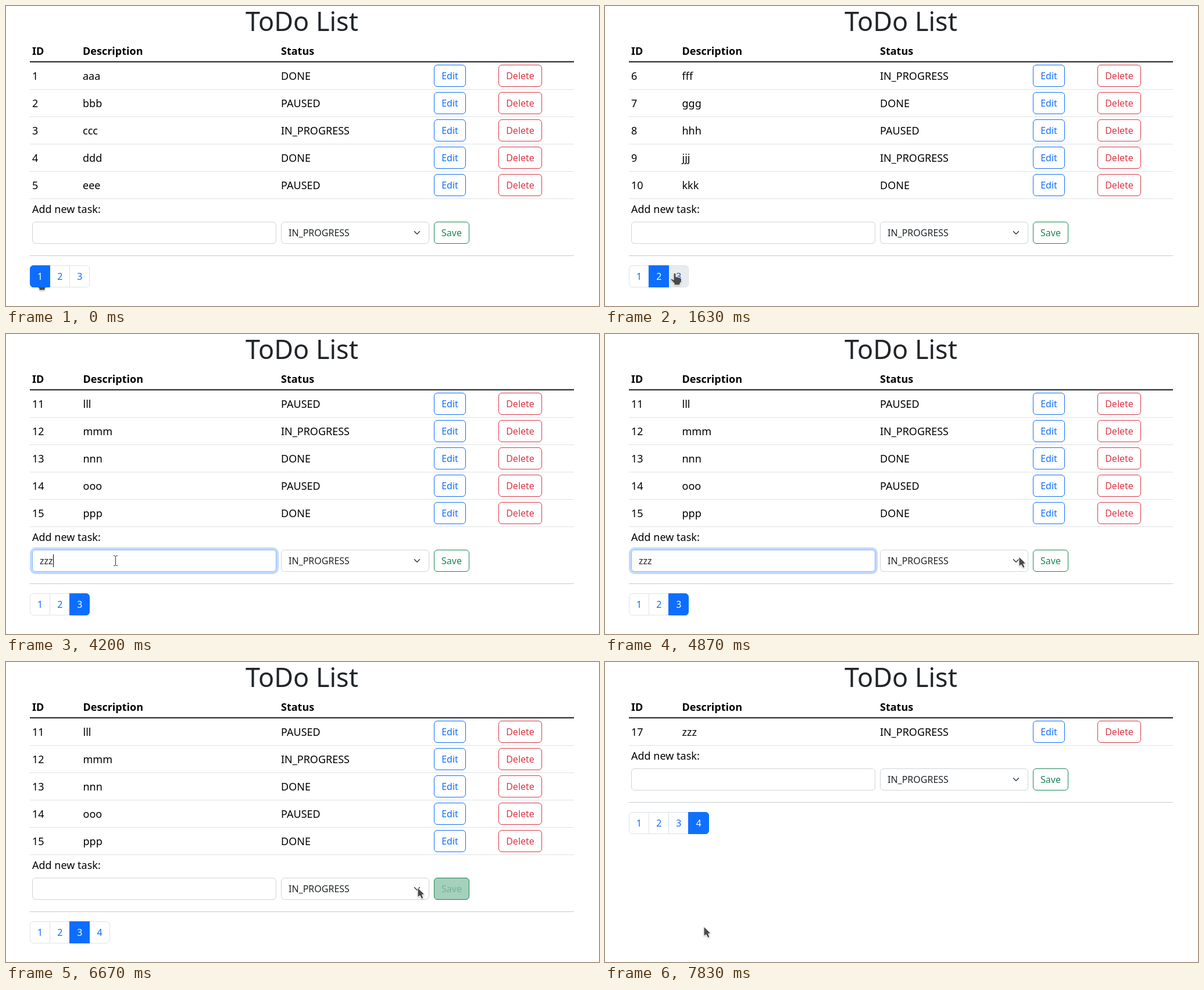
An HTML page that plays this animation: 1020 by 516 pixels, repeating every 8000 ms.

```html
<!DOCTYPE html>
<html lang="en">
<head>
<meta charset="utf-8">
<title>ToDo List</title>
<style>
  html, body { margin: 0; width: 100%; height: 100%; overflow: hidden; background: #fff; }
  body { position: relative; font: 18px/27px "Noto Sans", sans-serif; color: #000; }
  body *, svg { box-sizing: border-box; }
  .abs, .row, .row > *, #form, #form > * { position: absolute; white-space: pre; }
  h1 { left: 41px; width: 936px; top: -1px; margin: 0; font-size: 45px; line-height: 54px;
       font-weight: 300; text-align: center; color: #212529; }
  .row { left: 41px; width: 936px; height: 47px; border-bottom: 1px solid #dee2e6; }
  .row > span { top: 10px; }
  .row > :nth-child(1) { left: 4px; }
  .row > :nth-child(2) { left: var(--desc); }
  .row > :nth-child(3) { left: 432px; }
  .head { top: 50px; border-bottom: 2px solid #212529; font-weight: 700; }
  .head > span { top: 14px; }
  .btn, .field { height: 38px; border: 1px solid; border-radius: 6px; font-size: 16px; line-height: 36px; }
  .btn { text-align: center; }
  .row .btn { top: 4px; }
  .edit { left: 695px; width: 55px; color: #0d6efd; }
  .delete { left: 806px; width: 75px; color: #dc3545; }
  #form { left: 0; top: 0; width: 1020px; height: 516px; }
  .field { top: 371px; padding-left: 12px; border-color: #ced4da; color: #212529; }
  #input { left: 45px; width: 420px; }
  #caret { left: 58px; top: 379px; width: 1px; height: 22px; background: #000; }
  #select { left: 473px; width: 255px; }
  #select svg { position: absolute; right: 12px; top: 12px; }
  #save { left: 736px; top: 371px; width: 61px; border-color: #198754; }
  #hr { left: 41px; top: 429px; width: 936px; height: 1px; background: #c8c9ca; }
  #pages { left: 41px; top: 446px; display: flex; font-size: 16px; line-height: 36px; }
  #pages span { height: 38px; padding: 0 12px; border: 1px solid; margin-left: -1px; }
  #pages span:first-child { margin-left: 0; border-radius: 6px 0 0 6px; }
  #pages .last { border-radius: 0 6px 6px 0; }
  #cursor { left: 0; top: 0; overflow: visible; }
</style>
</head>
<body>
<h1 class="abs">ToDo List</h1>
<div class="row head"><span>ID</span><span>Description</span><span>Status</span></div>
<div id="rows"></div>
<div id="form">
  <span style="left:45px;top:336px">Add new task:</span>
  <div id="input" class="field"></div>
  <div id="caret"></div>
  <div id="select" class="field">IN_PROGRESS<svg width="16" height="12" viewBox="0 0 16 16"><path
    d="m2 5 6 6 6-6" fill="none" stroke="#343a40" stroke-width="2" stroke-linecap="round" stroke-linejoin="round"/></svg></div>
  <div id="save" class="btn">Save</div>
  <div id="hr"></div>
  <div id="pages"><span>1</span><span>2</span><span>3</span><span>4</span></div>
</div>
<svg id="cursor" class="abs" width="1" height="1"><path stroke-linejoin="round"/></svg>
<script>
const LOOP = 8000, FADE = 150;
const $ = id => document.getElementById(id);
const STATUS = { D: 'DONE', P: 'PAUSED', I: 'IN_PROGRESS' };

// Each page: time it opens, first id, description letters, status letters
const PAGES = [
  [-FADE, 1, 'abcde', 'DPIDP'],
  [930, 6, 'fghjk', 'IDPID'],
  [1800, 11, 'lmnop', 'PIDPD'],
  [7690, 17, 'z', 'I'],
];
const HOVERS = [[LOOP, LOOP], [480, 1400], [1400, 2200], [7430, 7690]];

// Pointer stops: time, x, y, shape from here on, easing towards this stop
const smooth = k => k * k * (3 - 2 * k);
const easeOut = k => 1 - (1 - k) ** 1.5;
const linear = k => k;
const PATH = [
  [0, 58, 468, 'hand'],
  [200, 58, 468, 'hand'],
  [770, 91, 466, 'hand', smooth],
  [1150, 91, 466, 'hand'],
  [1700, 121, 459, 'hand', smooth],
  [2050, 121, 459, 'hand'],
  [2330, 133, 441, 'arrow', k => k * k],
  [2640, 170, 409, 'beam', linear],
  [2850, 188, 390, 'beam', easeOut],
  [4220, 188, 390, 'beam'],
  [4560, 467, 387, 'arrow', k => k ** 1.5],
  [4870, 711, 383, 'arrow', k => 1 - (1 - k) ** 1.3],
  [5000, 760, 387, 'hand', easeOut],
  [6560, 760, 387, 'hand'],
  [6590, 740, 387, 'arrow', linear],
  [6670, 709, 388, 'arrow', linear],
  [7420, 170, 455, 'hand', easeOut],
  [7720, 170, 455, 'arrow'],
  [LOOP, 170, 455, 'arrow'],
];
const SHAPES = {
  arrow: 'M0 0V16.5L4 13.8 7 19.5 10 18 7.6 12.3 12 11.8Z',
  hand: 'M-2 1.5Q0-1.5 2 1.5V7L4 6.5 5.5 7.5 8 7.5 9 8.8 11.5 9.5V15L9 18V21H-1V18L-7 11.5Q-6 9-2 12Z',
  beam: 'M-3-8.5H-1L.5-7.5 2-8.5H4M.5-7.5V7.5M-3 8.5H-1L.5 7.5 2 8.5H4',
};

const ramp = (t, start) => smooth(Math.min(1, Math.max(0, (t - start) / FADE)));
const pulse = (t, on, off) => ramp(t, on) - ramp(t, off);
const mix = (a, b, k) => `color-mix(in srgb, ${a}, ${b} ${k * 100}%)`;

function drawRows([, first, letters, states]) {
  $('rows').innerHTML = [...letters].map((c, i) => `<div class="row" style="top:${97 + 47 * i}px">
    <span>${first + i}</span><span>${c.repeat(3)}</span><span>${STATUS[states[i]]}</span>
    <div class="btn edit">Edit</div><div class="btn delete">Delete</div></div>`).join('');
  document.body.style.setProperty('--desc', first > 1 ? '91.5px' : '91px');
  $('form').style.top = 47 * (letters.length - 5) + 'px';
}

function drawPager(t) {
  const count = t < 6130 ? 3 : 4;
  [...$('pages').children].forEach((el, i) => {
    const active = ramp(t, PAGES[i][0]) - (PAGES[i + 1] ? ramp(t, PAGES[i + 1][0]) : 0);
    const hover = pulse(t, ...HOVERS[i]);
    el.style.display = i < count ? '' : 'none';
    el.className = i === count - 1 ? 'last' : '';
    el.style.background = mix(mix('#fff', '#e9ecef', hover), '#0d6efd', active);
    el.style.color = mix(mix('#0d6efd', '#0a58ca', hover), '#fff', active);
    el.style.borderColor = mix('#dee2e6', '#0d6efd', active);
    el.style.zIndex = active > 0.5 ? 1 : 0;
  });
}

function drawForm(t) {
  const typed = t < 6130 ? [3670, 3900, 4200].filter(at => t >= at).length : 0;
  const focus = pulse(t, 2915, 5710), save = pulse(t, 5000, 6585);
  const lastKey = [2915, 3670, 3900, 4200][typed];
  const caretOn = t >= 2915 && t < 5730 && (t - lastKey) % 1200 < 590;
  $('input').textContent = 'z'.repeat(typed);
  $('input').style.borderColor = mix('#ced4da', '#86b7fe', focus);
  $('input').style.boxShadow = `0 0 0 ${4 * focus}px rgba(13,110,253,${0.25 * focus})`;
  $('caret').style.display = caretOn ? '' : 'none';
  $('caret').style.left = Math.round(58 + 7.52 * typed) + 'px';
  $('save').style.background = mix('#fff', '#198754', save);
  $('save').style.color = mix('#198754', '#fff', save);
}

function drawCursor(t) {
  const i = PATH.findIndex(p => p[0] > t);
  const [t0, x0, y0, shape] = PATH[i - 1], [t1, x1, y1, , ease = linear] = PATH[i];
  const k = ease((t - t0) / (t1 - t0));
  const x = Math.round(x0 + (x1 - x0) * k), y = Math.round(y0 + (y1 - y0) * k);
  const path = $('cursor').firstChild, beam = shape === 'beam';
  path.setAttribute('d', SHAPES[shape]);
  path.setAttribute('transform', `translate(${x} ${y})`);
  path.setAttribute('fill', beam ? 'none' : '#4a4a4a');
  path.setAttribute('stroke', beam ? '#333' : '#fff');
  path.style.filter = beam ? '' : 'drop-shadow(0 1px 1px rgba(0,0,0,.25))';
}

let shown;
function render() {
  const t = performance.now() % LOOP;
  const page = PAGES.findLast(p => t >= p[0]);
  if (page !== shown) drawRows(shown = page);
  drawPager(t);
  drawForm(t);
  drawCursor(t);
  requestAnimationFrame(render);
}
render();
</script>
</body>
</html>
```
